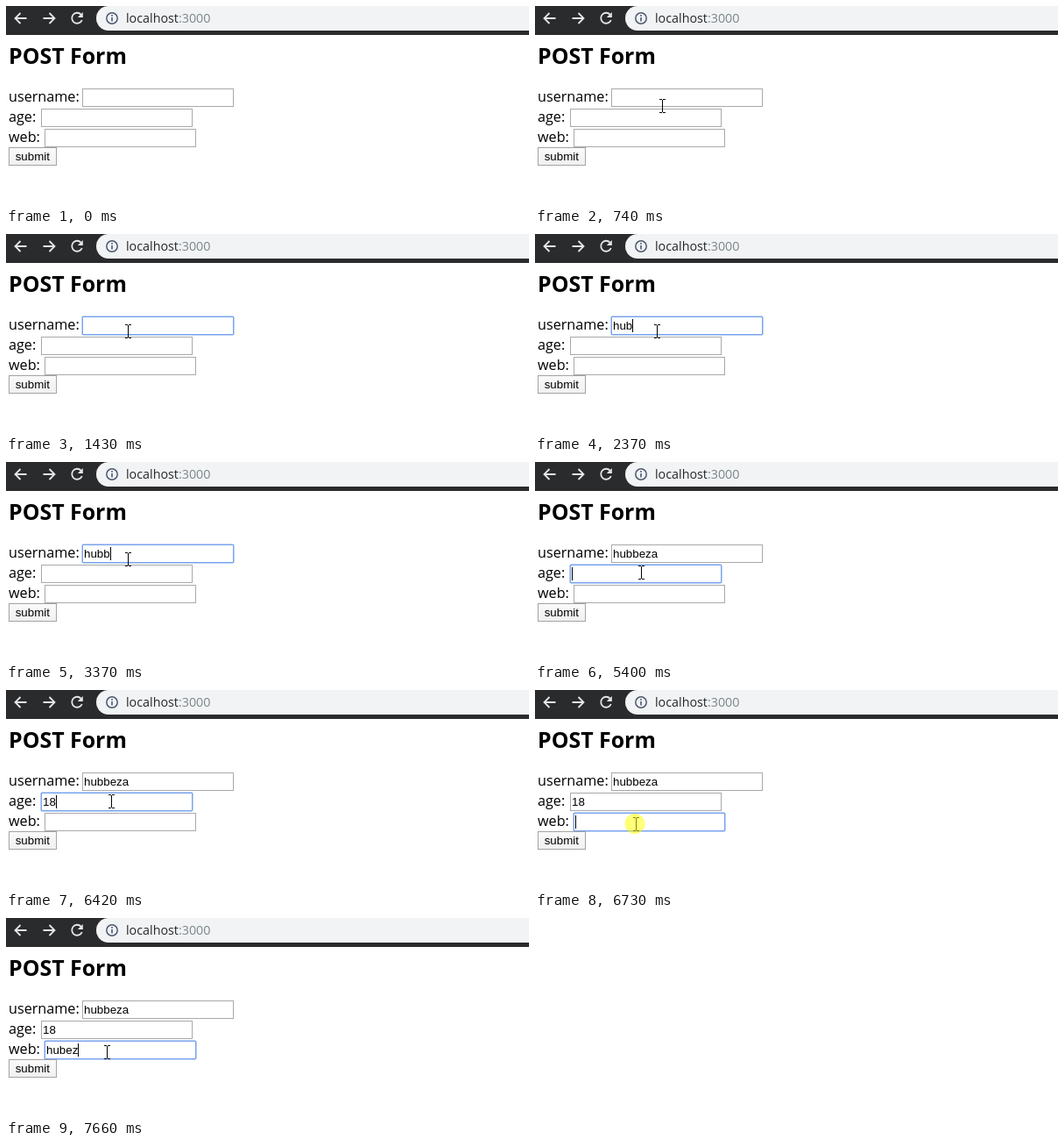
Write an HTML page that moves like this. It is 597 px wide and 228 px high and loops after 8 s.

```html
<!DOCTYPE html>
<html lang="en">
<head>
<meta charset="utf-8">
<title>POST Form</title>
<style>
  html, body { margin: 0; width: 100%; height: 100%; overflow: hidden; background: #fff; }
  svg { display: block; width: 597px; height: 228px; }
  text { white-space: pre; }
  .page { font: 16.2px "Open Sans", "Noto Sans", sans-serif; }
  .title { font: bold 24.9px "Open Sans", "Noto Sans", sans-serif; }
  .url { font: 14.3px "Open Sans", "Noto Sans", sans-serif; }
  .control { font: 13.333px "Liberation Sans", Arial, sans-serif; }
  .icon { fill: none; stroke: #e4e6e9; stroke-width: 1.8; }
</style>
</head>
<body>
<svg id="stage" viewBox="0 0 597 228">
  <defs>
    <linearGradient id="face" x2="0" y2="1">
      <stop stop-color="#fafafa"/>
      <stop offset="1" stop-color="#f0f0f0"/>
    </linearGradient>
  </defs>
  <rect width="597" height="228" fill="#fff"/>
  <rect width="597" height="33" fill="#2a2b2d"/>
  <rect x="103" y="0" width="530" height="28" rx="14" fill="#f1f3f4"/>
  <path class="icon" d="M23.5 14H10.5M16.5 8l-6 6 6 6"/>
  <path class="icon" d="M42.5 14h13M49.5 8l6 6-6 6"/>
  <path class="icon" d="M85.6 9.6A6 6 0 1 0 86.8 16"/>
  <path d="M87.8 7v6h-6z" fill="#e4e6e9"/>
  <circle cx="121" cy="14" r="6.2" fill="none" stroke="#4d5872" stroke-width="1.5"/>
  <path d="M121 13v4.5M121 10v1.7" stroke="#4d5872" stroke-width="1.6"/>
  <text class="url" x="137" y="18.5" fill="#25272b">localhost<tspan fill="#7c858c">:3000</tspan></text>

  <text class="title" x="3" y="66">POST Form</text>
  <g id="form"></g>
  <rect x="3.5" y="161.5" width="54" height="20" fill="url(#face)" stroke="#a3a3a3"/>
  <text class="control" x="10.7" y="176">submit</text>

  <rect id="caret" width="1" height="15"/>
  <path id="beam" d="M-3 -7.5H0M1 -7.5H4M.5 -7V7M-3 7.5H0M1 7.5H4" fill="none" stroke="#000"/>
  <path id="arrow" d="M.5 .5V16.5L4.3 13 6.8 18.6 9.3 17.5 6.9 12H12Z" fill="#fff" stroke="#000"/>
  <circle id="halo" r="11.5" fill="#ff0" fill-opacity=".53"/>
</svg>
<script>
const LOOP = 8000;
const NS = 'http://www.w3.org/2000/svg';
const $ = id => document.getElementById(id);

function add(name, attrs, text = '') {
  const el = document.createElementNS(NS, name);
  for (const key in attrs) el.setAttribute(key, attrs[key]);
  el.textContent = text;
  return $('form').appendChild(el);
}

const fields = [['username:', 87, 94], ['age:', 40, 117], ['web:', 44, 140]].map(([label, x, y]) => {
  add('text', { class: 'page', x: 3, y: y + 15 }, label);
  const box = add('rect', { x: x + .5, y: y + .5, width: 172, height: 20, fill: '#fff', stroke: '#a9a9a9' });
  const ring = add('rect', { x: x + .25, y: y + .25, width: 172.5, height: 20.5, rx: 1,
    fill: 'none', stroke: '#78a3ec', 'stroke-width': 1.5 });
  const text = add('text', { class: 'control', x: x + 2, y: y + 15 });
  return { x, y, box, ring, text };
});

// [time, field, typed value]
const typing = [
  [2060, 0, 'h'], [2130, 0, 'hu'], [2300, 0, 'hub'], [2380, 0, 'hube'], [2450, 0, 'hubez'],
  [2850, 0, 'hube'], [2920, 0, 'hub'], [3370, 0, 'hubb'], [3540, 0, 'hubbe'],
  [3690, 0, 'hubbez'], [4390, 0, 'hubbeza'],
  [5800, 1, '1'], [5870, 1, '18'],
  [7270, 2, 'h'], [7340, 2, 'hu'], [7510, 2, 'hub'], [7660, 2, 'hubez']
];
// [time, field, halo x, halo y, letters right of the caret]
const clicks = [
  [890, 0, 139, 110.5, 0], [4940, 0, 130.5, 110.5, 1],
  [5320, 1, 121, 126.5, 0], [6730, 2, 114, 152.5, 0]
];
const caretOff = [[1430, 1890], [4240, 4390], [6430, 6730]];
// [time, x, y]
const moves = [
  [810, 139, 111],
  [4710, 143, 111], [4790, 141, 111], [4860, 135, 111], [4940, 132, 111],
  [5170, 130, 114], [5250, 123, 122], [5320, 121, 126], [5800, 120, 126],
  [6350, 120, 127], [6430, 119, 132], [6500, 118, 139], [6580, 116, 148], [6650, 115, 153]
];

const last = (list, t) => list.filter(e => e[0] <= t).pop();
const show = (el, on) => el.setAttribute('visibility', on ? 'visible' : 'hidden');
const place = (el, x, y) => el.setAttribute('transform', `translate(${x} ${y})`);

function pointer(t) {
  if (t < 70) return null;
  if (t >= 810) return last(moves, t).slice(1);
  const p = Math.floor((t - 70) / 74) / 10;
  const e = p * p * (3 - 2 * p);
  return [Math.round(350 - 211 * e), Math.round(218 - 107 * e)];
}

function draw(t) {
  const click = last(clicks, t);
  fields.forEach((f, i) => {
    const entry = last(typing.filter(e => e[1] === i), t);
    f.value = entry ? entry[2] : '';
    if (f.text.textContent !== f.value) f.text.textContent = f.value;
    show(f.ring, click && click[1] === i);
  });

  show($('caret'), click && !caretOff.some(([a, b]) => t >= a && t < b));
  show($('halo'), click && t < click[0] + 80);
  if (click) {
    const [, index, haloX, haloY, after] = click;
    const f = fields[index];
    const count = f.value.length - after;
    const width = count > 0 ? f.text.getSubStringLength(0, count) : 0;
    place($('caret'), Math.round(f.x + 2 + width), f.y + 3);
    place($('halo'), haloX, haloY);
  }

  const pos = pointer(t);
  const inside = pos && fields.some(f =>
    pos[0] >= f.x && pos[0] <= f.x + 173 && pos[1] >= f.y - 1 && pos[1] <= f.y + 22);
  show($('beam'), inside);
  show($('arrow'), pos && !inside);
  if (pos) place(inside ? $('beam') : $('arrow'), ...pos);
}

const start = performance.now();
function tick() {
  draw((performance.now() - start) % LOOP);
  requestAnimationFrame(tick);
}
tick();
</script>
</body>
</html>
```
